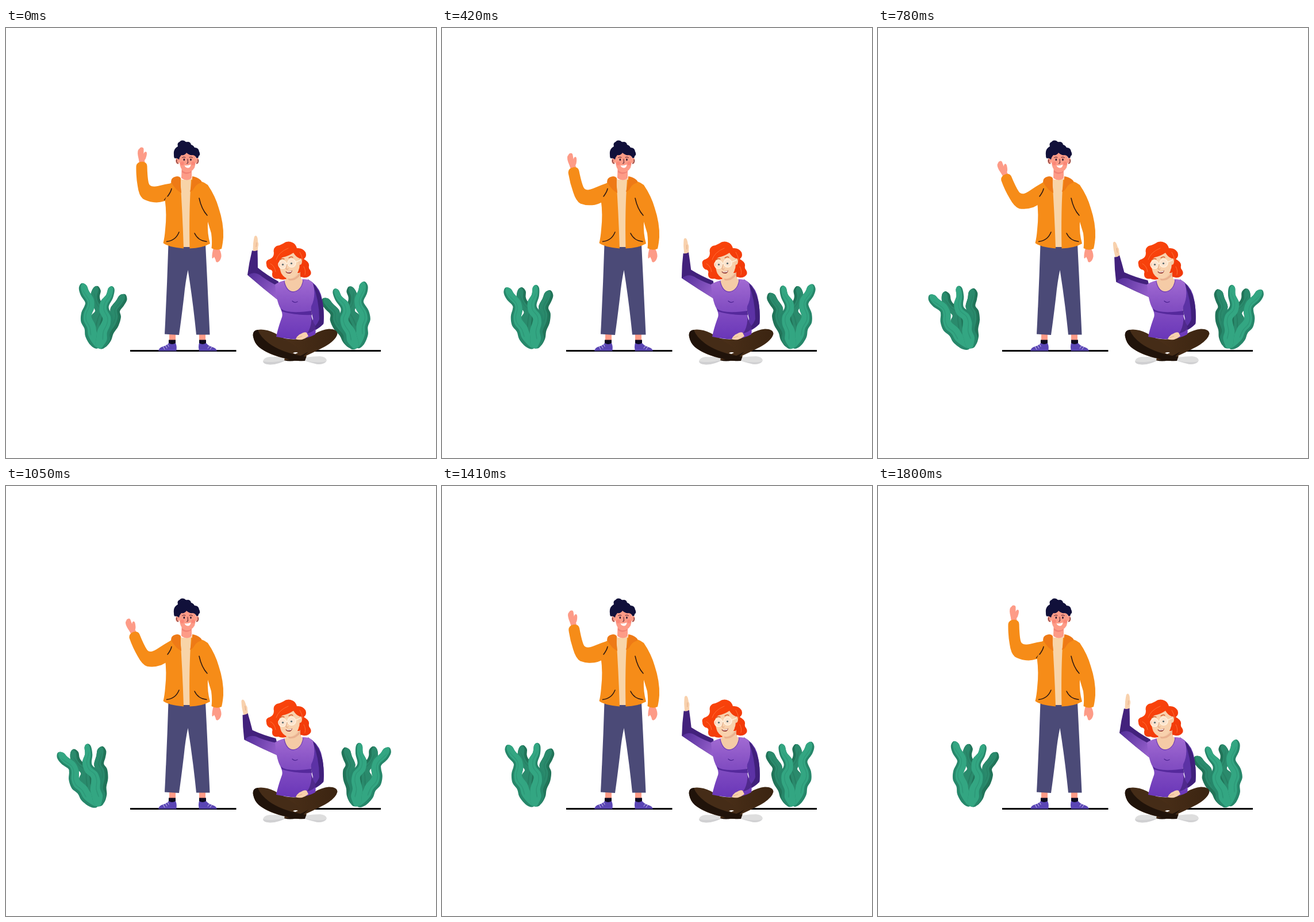
An HTML page for the animation above (1.83 s loop, 748 by 748 pixels).

```html
<!DOCTYPE html>
<html lang="en">
<head>
<meta charset="utf-8">
<title>Waving friends</title>
<style>
  html, body { margin: 0; width: 100%; height: 100%; overflow: hidden; background: #fff; }
  svg { display: block; width: 100vw; height: 100vh; }
  .line { fill: none; stroke-linecap: round; stroke-linejoin: round; }
</style>
</head>
<body>
<svg viewBox="0 0 748 748" xmlns="http://www.w3.org/2000/svg">
  <defs>
    <linearGradient id="top" x1="0" y1="0" x2="0" y2="1">
      <stop offset="0" stop-color="#a26bd3"/><stop offset=".45" stop-color="#8550c3"/><stop offset="1" stop-color="#6936b8"/>
    </linearGradient>
    <linearGradient id="sleeve" gradientUnits="userSpaceOnUse" x1="424" y1="426" x2="474" y2="462">
      <stop offset="0" stop-color="#56309b"/><stop offset="1" stop-color="#9660cc"/>
    </linearGradient>
    <linearGradient id="hair" x1="0" y1="0" x2="1" y2="1">
      <stop offset="0" stop-color="#fb460c"/><stop offset="1" stop-color="#f03809"/>
    </linearGradient>
    <linearGradient id="leg" x1="0" y1="0" x2="1" y2="0">
      <stop offset="0" stop-color="#4f331b"/><stop offset="1" stop-color="#3b2411"/>
    </linearGradient>
    <g id="plant"></g>
  </defs>

  <!-- ground -->
  <path d="M216 561.500H400.500M530 561.500H652" stroke="#000" stroke-width="3"/>
  <use id="plantL" href="#plant"/>
  <use id="plantR" href="#plant"/>

  <g id="man">
    <!-- legs and shoes -->
    <path d="M284 530h11v15h-11zM336 530h11v15h-11z" fill="#fd9b87"/>
    <path d="M283 542.500h12v9h-12zM336 542.500h12v9h-12z" fill="#0d0b20"/>
    <path d="M265 562Q266 556 273 554Q280 552 283 548Q289 552 295 548Q298 555 296 562ZM336 562Q334 554 336 548Q342 552 348 548Q352 553 359 555Q366 557 367 562Z" fill="#5a45b4"/>
    <path class="line" d="M273 554l3 5M277 552l3 5M281 550l2 4M358 555l-3 4M354 553l-3 4" stroke="#ddd8f5" stroke-width=".9"/>
    <path d="M266 562H297M335 562H367" stroke="#1a1638" stroke-width="1.600"/>
    <path d="M282.500 376H347Q351 455 354.500 533.500H331Q325 474 316.500 421Q312 442 309.500 468Q305 506 301 534L276 532.500Q280 455 282.500 376Z" fill="#4b4a77"/>

    <!-- hanging hand and shirt -->
    <path d="M361 383L371 384Q376 394 374 400Q372 406 368 407.500Q365 408 364.500 403L362 398Q360 402 358.500 400Q358 392 361 383Z" fill="#fd9b87"/>
    <path d="M301 262Q314 267 325 261L322 381H306Z" fill="#f8d4a8"/>

    <g id="manArm">
      <path d="M232 236Q231 228 229.500 222Q228 212 232 210Q234 207 237 207.700Q240 208 239.500 213V219Q241 214.500 244 215.500Q246 217 244 224Q243 228 241 230L242 237Z" fill="#fd9b87"/>
      <path d="M294 269Q280 271 264 275Q250 278 248 269Q246 260 245.500 240Q245 233 237 232.500Q228 232.500 226.500 240Q226 258 229 275Q231 291 238 297Q248 303 262 303.500Q275 303 291 295Z" fill="#f68c18"/>
      <path class="line" d="M288 279.500Q284 290 275.500 299" stroke="#2b1712" stroke-width="1.500"/>
    </g>

    <!-- jacket -->
    <path d="M303 263Q293 264 286 270L283 285L276.500 299Q280 325 277 350Q276 364 273.500 374Q282 381 309 383.500Q307 320 303 263Z" fill="#f68c18"/>
    <path d="M322 264Q342 265 351 273Q364 292 370 313Q379 340 378 364Q377 376 375 384Q366 388 357.500 383Q359 372 357 357L351 337Q350 358 355 375Q341 383 319.500 383.500Q318 317 322 264Z" fill="#f68c18"/>
    <path d="M287 268Q287 260 295 258.500Q301 257 304 261Q303 274 305 287Q296 283 287 268ZM320 285Q324 270 324 258Q332 259 338 264Q343 268 337 270Q331 272 327 279Q324 284 320 285Z" fill="#ee7a16"/>
    <g class="line" stroke="#2b1712" stroke-width="1.500">
      <path d="M288 279.500Q287 285 281 293M336 296Q340 315 350 326M279.500 371.500Q295 370 301 355M328 357Q334 370 349 371.500"/>
    </g>

    <!-- head -->
    <path d="M305.500 245H323V261Q315 268 305 261Z" fill="#fd9b87"/>
    <path d="M306 247Q314 255 323 248V250Q314 257 306 251Z" fill="#f18375"/>
    <ellipse cx="298.500" cy="231" rx="3.500" ry="5.500" fill="#fd9b87"/>
    <ellipse cx="332.500" cy="231" rx="3" ry="5.500" fill="#fd9b87"/>
    <path class="line" d="M299.500 236q-4-2-2.500-7M331.500 236q4-2 2.500-7" stroke="#3a1420" stroke-width="1"/>
    <path d="M301 218Q315 209 330 219Q331 234 328 243Q323 251 316 251Q308 251 304 243Q301 236 301 218Z" fill="#fd9b87"/>
    <path d="M301 229Q299 226 295 226.500Q292 228 292 221Q291 213 295 209Q297 207 299 206Q297 200 302 198Q305 194 311 196.500Q312 199 316 198Q321 198 322 203Q326 204 328 208Q335 208 336 215Q339 220 335 223Q335 227 331 226Q330 222 325 221Q319 222 314 217Q311 222 305 221Q302 224 301 229Z" fill="#11103a"/>
    <circle cx="306.500" cy="235.500" r="3.200" fill="#f9766a" opacity=".55"/>
    <circle cx="325.500" cy="235.500" r="3.200" fill="#f9766a" opacity=".55"/>
    <path class="line" d="M306.500 225.500q2.500-2 5.500-.5M319 225q3-1.500 5.500 .5M316 228l.5 7-2 .5" stroke="#381225" stroke-width=".9"/>
    <ellipse cx="309.800" cy="229" rx="1.200" ry="1.900" fill="#1a0c28"/>
    <ellipse cx="321.500" cy="229" rx="1.200" ry="1.900" fill="#1a0c28"/>
    <path d="M310.500 239Q316 240 321.500 237.500Q321 243 316.500 243.500Q312 243 310.500 239Z" fill="#fff"/>
  </g>

  <g id="woman">
    <g id="womanArm">
      <path d="M429.500 389L430 375Q431 367 432 363Q434 360 436 362Q438 364 438 372Q440 375 438.500 380L437.500 389Z" fill="#f8d1ad"/>
      <path d="M436 373l-1 8" stroke="#e2a985" stroke-width=".9"/>
      <path d="M428 387Q433 389 437.500 386.500Q438 402 438 417Q454 430 474 441V474Q446 452 420 429.500Q423 407 428 387Z" fill="#42217c"/>
      <path d="M422 429Q434 422 446 433Q460 443 474 449V474Q447 453 422 431Z" fill="url(#sleeve)"/>
    </g>

    <!-- legs and shoes -->
    <path d="M447 579Q449 573 459 572Q472 573 486 570L489 578Q476 583 463 585Q447 586 447 579ZM521 573Q535 571 546 571Q557 572 558 578Q556 585 545 585Q533 584 520 579Z" fill="#dedede"/>
    <path d="M447 580Q466 583 488 577Q473 586 459 585.500Q448 585 447 580ZM520 578Q540 584 557 580Q550 586 540 584.500Z" fill="#d0d0d2"/>
    <path d="M468 534Q502 550 537 532Q548 525 562 523.500Q576 523.500 576.500 532Q574 543 555 554Q532 566 511 575Q499 581 484 578L486 570L504 562Q474 556 453 542Z" fill="url(#leg)"/>
    <path d="M430 537Q428 527 438 525Q451 523 468 531Q482 540 498 550Q512 560 523 571L520 578Q503 581 487 575Q457 569 440 555Q432 548 430 537Z" fill="#452c17"/>
    <path d="M430 537Q428 526 438 525Q442 537 458 549Q480 565 522 572L520 579Q502 580 487 575Q455 567 440 555Q432 548 430 537Z" fill="#20130a"/>
    <path d="M484 578Q504 576 526 563Q517 573 505 578Q494 581 484 578Z" fill="#20130a"/>
    <path d="M499 565.500Q504 563 508 565L503 567Z" fill="#fff"/>

    <!-- top -->
    <path d="M525 437Q542 446 548 464Q554 486 552.500 514Q544 525 521 533L518 526Q533 517 534 506L526 470Z" fill="#5c32a5"/>
    <path d="M533 443Q546 456 551 478Q554 498 552 515Q543 524 525 531Q543 516 545 506Q545 474 533 443Z" fill="#40207b"/>
    <path d="M468 446Q474 442 485 439Q500 450 516 437Q528 436 534 444Q540 466 531 484Q529 500 536 514Q540 524 538 533Q514 547 470 537Q473 522 480 503Q482 497 477 487Q470 474 468 446Z" fill="url(#top)"/>
    <path d="M478 488Q490 498 531 492L532 499Q502 500 480 493Z" fill="#55299c"/>
    <path d="M531 488Q529 500 536 514L540 522Q534 529 524 531Q534 517 531 488Z" fill="#46237f" opacity=".8"/>
    <path class="line" d="M498 475q4 4 9 1" stroke="#4b2290" stroke-width="1.200"/>
    <path d="M504 541Q507 534 513 532Q519 528 523 530L526 536Q521 540 515 542Q509 543 504 541Z" fill="#f8d1ad"/>
    <path class="line" d="M507 539l8-3" stroke="#dca684" stroke-width=".8"/>

    <!-- head -->
    <path d="M453 411Q451 404 459 402Q466 399 466 391Q464 383 471 379Q477 378 482 375Q490 369 499 373.500Q504 376 506 383Q516 382 521 390Q524 397 518 402Q528 407 527 414Q526 418 529 421Q533 428 527 432Q521 436 514 433Q505 439 493 435Q482 440 474 436Q462 438 463 427Q465 421 458 420Q453 417 453 411Z" fill="url(#hair)"/>
    <path d="M488 426H511Q512 436 517 440Q514 458 499 459Q487 457 484 441Q489 438 488 426Z" fill="#f5cba6"/>
    <path d="M490 435Q501 440 512 424L512 430Q503 441 492 439Z" fill="#e9b190"/>
    <path class="line" d="M484 441Q488 459 500 459Q514 457 517 439" stroke="#7340b5" stroke-width="1.300"/>
    <path d="M476 402Q485 391 498 388Q508 390 510 399Q513 413 508 424Q503 434 495 436Q485 437 479 427Q474 415 476 402Z" fill="#f8d1ad"/>
    <ellipse cx="511.500" cy="406" rx="3.500" ry="6" fill="#f5cba6"/>
    <path d="M473 410Q472 394 487 387Q498 384 508 387Q514 392 514 401Q506 401 500 391Q491 397 481 399Q476 402 473 410Z" fill="url(#hair)"/>
    <path class="line" d="M470 403Q474 390 491 383M511 390Q515 396 516 404M460 410q7 3 9 14M518 415q4 7 2 14" stroke="#ff7a42" stroke-width=".8"/>
    <path class="line" d="M477 403q3-3 7-1M492 400q4-3 7-1" stroke="#cf4a18" stroke-width="1.200"/>
    <g fill="#fff" fill-opacity=".4" stroke="#fff1dc" stroke-width="1.600">
      <circle cx="481" cy="411.500" r="7"/><circle cx="497" cy="409" r="7"/>
    </g>
    <circle cx="481.500" cy="411.500" r="1.600" fill="#56666a"/><circle cx="496.500" cy="409.500" r="1.600" fill="#56666a"/>
    <path class="line" d="M488 410h2M504 407l8-3" stroke="#fff1dc" stroke-width="1.600"/>
    <path class="line" d="M489 411q-2 6-2 8 2 2 4 0" stroke="#d99b78" stroke-width="1"/>
    <path d="M486 423.500Q492 425 498 421.500Q497 427 492.500 427Q488 427 486 423.500Z" fill="#8c2b24"/>
    <path d="M487 423.700Q492 425 497.500 422L496 424.500Q491 426.500 487 423.700Z" fill="#fff"/>
  </g>
</svg>
<script>
const byId = id => document.getElementById(id);

// Closed Catmull-Rom curve through points
function blob(pts) {
  const n = pts.length, at = i => pts[(i + n) % n];
  let d = `M${at(0)}`;
  for (let i = 0; i < n; i++) {
    const [a, b, c, e] = [at(i - 1), at(i), at(i + 1), at(i + 2)];
    const c1 = b.map((v, k) => v + (c[k] - a[k]) / 6);
    const c2 = c.map((v, k) => v - (e[k] - b[k]) / 6);
    d += `C${c1} ${c2} ${c}`;
  }
  return d + 'Z';
}

// Leaf from a spine of [x, y, half width]; lo and hi pick a strip across it
function strip(spine, lo, hi) {
  const left = [], right = [];
  spine.forEach(([x, y, w], i) => {
    const p = spine[Math.max(i - 1, 0)], q = spine[Math.min(i + 1, spine.length - 1)];
    const dx = q[0] - p[0], dy = q[1] - p[1], l = Math.hypot(dx, dy);
    const side = k => [x + dy / l * w * k, y - dx / l * w * k];
    left.push(side(lo));
    right.unshift(side(hi));
  });
  const [x, y, w] = spine[0], [x2, y2] = spine[1];
  const l = Math.hypot(x - x2, y - y2), mid = (lo + hi) / 2;
  const tip = [x + (x - x2) / l * w * .9 + w * mid, y + (y - y2) / l * w * .9];
  return blob([tip, ...left, ...right]);
}

const LIGHT = '#33a682', SHADE = '#26876a', DARK = '#217459', DEEP = '#2a8a6c';
const leaves = [
  { spine: [[158, 455, 7], [155, 467, 8], [158, 479, 8], [165, 491, 10], [161, 504, 13], [157, 518, 14], [159, 535, 13], [162, 552, 6]],
    base: DARK, face: DEEP, lit: [-1, .4] },
  { spine: [[204, 469, 7.5], [198, 479, 8], [190, 490, 8.5], [191, 502, 9], [187, 514, 9.5], [178, 527, 10], [174, 541, 9], [168, 553, 5]],
    base: DARK, face: DEEP, lit: [-1, .4] },
  { spine: [[133.5, 450, 7], [137, 461, 8], [145, 474, 8], [145, 485, 8.5], [140, 497, 9], [140, 508, 10], [146, 520, 10], [148, 533, 10.5], [155, 546, 10], [161, 555, 5]],
    base: SHADE, face: LIGHT, lit: [-.5, 1] },
  { spine: [[183.5, 454, 5.5], [180, 467, 6.5], [172, 479, 8], [171, 491, 8.5], [177, 503, 9], [176, 515, 10], [170, 528, 11], [169, 541, 12], [164, 552, 9], [162, 557, 4]],
    base: SHADE, face: LIGHT, lit: [-1, .55] }
];
byId('plant').innerHTML = leaves.map(({ spine, base, face, lit }) =>
  `<path d="${strip(spine, -1, 1)}" fill="${base}"/>` +
  `<path d="${strip(spine, ...lit)}" fill="${face}"/>` +
  `<path d="${strip(spine.slice(1, -2), -.12, .02)}" fill="${base}" opacity=".45"/>`).join('');

const STEP = 30, LOOP = 1830, HALF = 900;
const turn = (id, deg, x, y, before = '') =>
  byId(id).setAttribute('transform', `${before}rotate(${deg} ${x} ${y})`);

function draw(now) {
  const t = Math.floor(now % LOOP / STEP) * STEP;
  const p = 1 - Math.abs(t - HALF) / HALF;
  const s = p * p * (3 - 2 * p);
  turn('plantL', -24 * s, 161, 559);
  turn('plantR', 7.8 - 24 * s, 161, 559, 'translate(771 0) scale(-1 1) ');
  turn('manArm', -22.3 * s, 288, 285);
  turn('womanArm', -15.5 * s, 464, 458);
}

let start;
function tick(now) {
  start ??= now;
  draw(now - start);
  requestAnimationFrame(tick);
}
draw(0);
requestAnimationFrame(tick);
</script>
</body>
</html>
```
